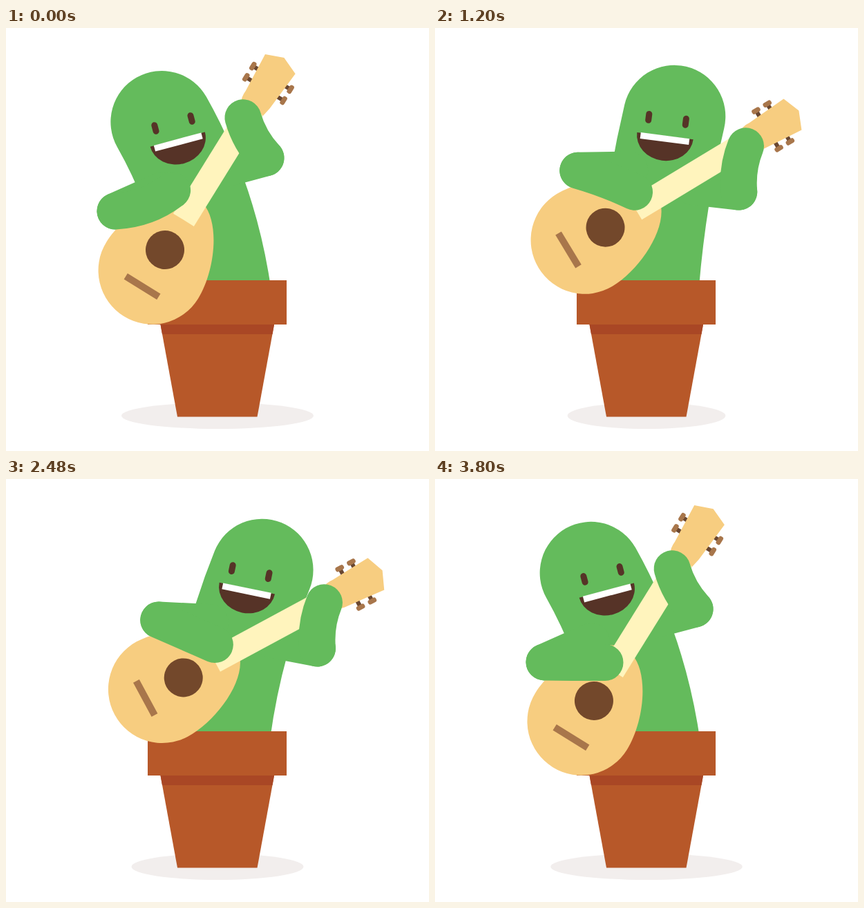
These frames come from a looping animation (612x612 px, 3.84 s). An HTML page without scripts:

```html
<!DOCTYPE html>
<html lang="en">
<head>
<meta charset="utf-8">
<title>Cactus guitarist</title>
<style>
/* --p: sway from left (0) to right (1); --s: strum angle against the guitar */
@property --p { syntax: "<number>"; inherits: true; initial-value: 0; }
@property --s { syntax: "<number>"; inherits: true; initial-value: -52; }

html, body { margin: 0; width: 100%; height: 100%; overflow: hidden; background: #fff; }

svg {
  --ease: linear(0, .004 5%, .027 12.5%, .074 20%, .139 27.1%, .227 35%, .316 41.7%, .348 43.75%,
    .46 50%, .665 60%, .765 65%, .861 70.8%, .927 77%, .97 83.3%, .993 91%, 1);
  --q: calc(var(--p) * var(--p));
  --c: calc(var(--p) * var(--p) * var(--p));
  --arc: calc(var(--p) * (1 - var(--p)));
  --lean: calc(31.8 + 39.6 * var(--p) + 13 * var(--q) - 21.7 * var(--c));
  display: block;
  width: 100%;
  height: 100%;
  animation: sway 1.92s var(--ease) infinite alternate;
}

.shadow {
  transform: translate(306px, 561px) scaleX(calc(1 - .87 * var(--arc)));
}
.body {
  transform: translate(calc(306.5px + 2.5px * var(--p)), calc(365px + 14px * var(--arc)))
    rotate(calc(39.8deg * var(--p) - 19.5deg));
}
.stem, .limb { fill: none; stroke: #64bb5c; stroke-linecap: round; stroke-linejoin: round; }
.stem { stroke-width: 148px; animation: bend 1.92s var(--ease) infinite alternate; }
.limb { stroke-width: 53px; }

.face {
  transform: translate(calc(242px + 41px * var(--p) + 240px * var(--q) - 159px * var(--c)),
      calc(138px - 28px * var(--arc)))
    rotate(calc(19deg * var(--p) + 32deg * var(--q) - 21deg * var(--c) - 15deg));
}
.guitar {
  transform: translate(calc(230px - 35.5px * var(--p) + 104px * var(--q) - 31px * var(--c)),
      calc(321px - 36.4px * var(--p) - 57.7px * var(--q) + 63.5px * var(--c)))
    rotate(calc(var(--lean) * 1deg));
}

.strum-elbow {
  transform: translate(calc(158px + 5px * var(--p) + 134px * var(--q) - 64px * var(--c)),
    calc(265px - 66.8px * var(--p) - 103.7px * var(--q) + 115px * var(--c)));
}
.strum-upper { transform: rotate(calc(38deg * var(--p) - 8deg * var(--q) - 24deg)); }
.strum-fore {
  transform: rotate(calc((var(--lean) + var(--s)) * 1deg));
  animation: strum 3.84s linear infinite;
}

.fret-elbow {
  transform: translate(calc(376px + 61.5px * var(--p) + 85px * var(--q) - 65px * var(--c)),
    calc(188px + 80px * var(--p) - 16px * var(--q)));
}
.fret-upper { transform: rotate(calc(30deg * var(--p) - 15deg)); }
.fret-fore { transform: rotate(calc(96deg * var(--p) - 60deg * var(--q) - 29.6deg)); }

@keyframes sway { from { --p: 0; } to { --p: 1; } }
@keyframes bend {
  from { d: path("M-7 39L0 0Q21 -123 0 -243"); }
  to { d: path("M7 39L0 0Q-21 -123 0 -243"); }
}
@keyframes strum {
  0% { --s: -52; d: path("M0 0Q44 14 88 0"); }
  8.33% { --s: -30; }
  13.54% { --s: 36; d: path("M0 0Q44 -9 86 0"); }
  17.7% { --s: 40; }
  21.875% { --s: 36; d: path("M0 0Q44 -7 86 0"); }
  31.25% { --s: -38; }
  34.4% { --s: -50; }
  41.67% { --s: -38; d: path("M0 0Q44 0 89 0"); }
  46.9% { --s: 35; }
  51% { --s: 40; }
  55.2% { --s: 35; }
  64.58% { --s: -38; d: path("M0 0Q44 0 89 0"); }
  67.7% { --s: -50; }
  79.17% { --s: -24; d: path("M0 0Q44 0 88 0"); }
  82% { --s: 25; }
  84.4% { --s: 40; }
  88.5% { --s: 35; }
  98.96% { --s: -31; d: path("M0 0Q44 0 88 0"); }
  100% { --s: -52; d: path("M0 0Q44 14 88 0"); }
}
</style>
</head>
<body>
<svg viewBox="0 0 612 612">
  <defs>
    <g id="peg">
      <path d="M22 0H31" stroke="#694731" stroke-width="6"/>
      <rect x="28.5" y="-6.5" width="7" height="13" rx="3" fill="#a8764b"/>
    </g>
    <g id="pegs">
      <use href="#peg" y="-293"/>
      <use href="#peg" y="-274"/>
    </g>
  </defs>

  <ellipse class="shadow" rx="139" ry="19" fill="#f2eeed"/>

  <g class="body"><path class="stem" d="M-7 39L0 0Q21 -123 0 -243"/></g>
  <g class="strum-elbow"><path class="limb strum-upper" d="M0 0H75"/></g>
  <g class="fret-elbow"><path class="limb fret-upper" d="M0 0H-68"/></g>

  <g class="face" fill="#563327">
    <rect x="-31.5" y="-9" width="9" height="18" rx="4.5"/>
    <rect x="22.5" y="-9" width="9" height="18" rx="4.5"/>
    <path d="M-41 24H41A41 36 0 0 1 -41 24Z"/>
    <path d="M-35.5 23.5H35.5V32.5H-35.5Z" fill="#fff"/>
  </g>

  <g class="pot" fill="#b75829">
    <path d="M223.5 429H388L363.5 562.5H248Z"/>
    <path d="M223.5 429H388L385.5 443H226Z" fill="#a94725"/>
    <path d="M205 365H406V429H205Z"/>
  </g>

  <g class="guitar">
    <use href="#pegs"/>
    <use href="#pegs" transform="scale(-1 1)"/>
    <g fill="#f7cd80">
      <path d="M-78 35A78 78 0 0 0 78 35C78 -15 42 -88 0 -88S-78 -15 -78 35Z"/>
      <path d="M-18 -238Q-23 -246 -22 -257L-26 -317L0 -327L26 -316L21 -254L18 -238Z"/>
    </g>
    <path d="M-17.6 -240H17.6V-51H-17.6Z" fill="#fff4bd"/>
    <circle r="28" fill="#73482b"/>
    <path d="M-28 57.5H28V67.5H-28Z" fill="#a8764b"/>
  </g>

  <g class="fret-elbow"><path class="limb fret-fore" d="M0 0Q-8 -34 0 -67"/></g>
  <g class="strum-elbow"><path class="limb strum-fore" d="M0 0Q44 14 88 0"/></g>
</svg>
</body>
</html>
```
